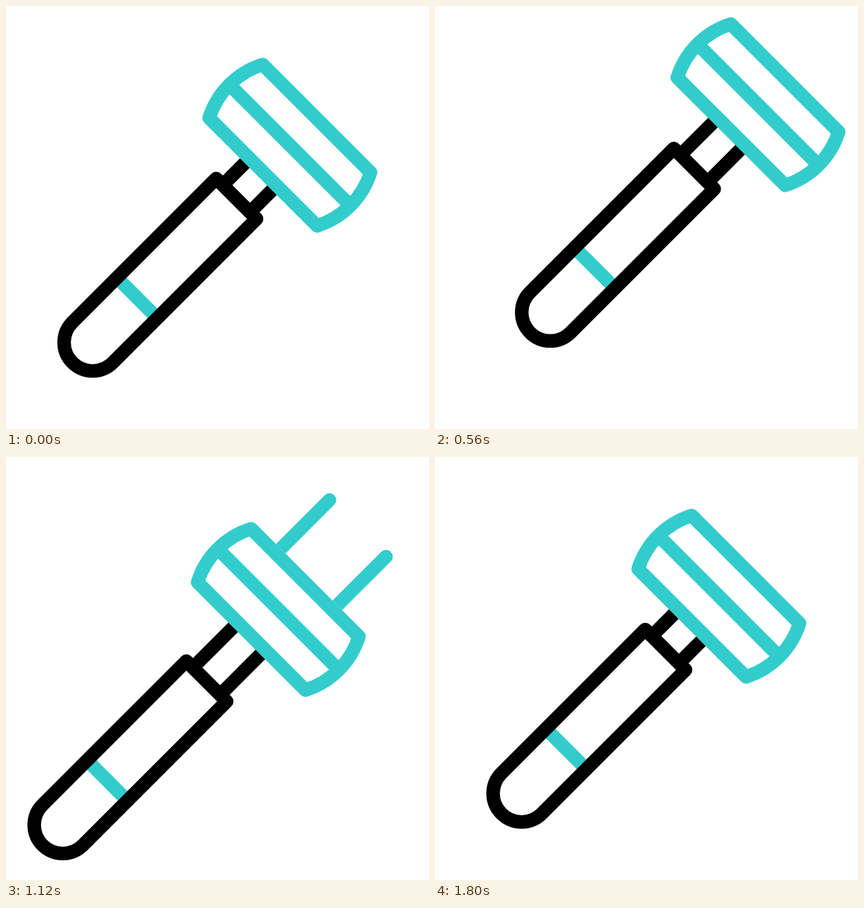
An HTML page with a canvas that plays this animation: 640 px wide and 640 px high, repeating every 2 s.

```html
<!DOCTYPE html>
<html lang="en">
<head>
<meta charset="utf-8">
<title>Razor</title>
<style>
html, body { margin: 0; width: 100%; height: 100%; overflow: hidden; background: #fff; }
canvas { display: block; width: 640px; height: 640px; }
</style>
</head>
<body>
<canvas id="stage" width="640" height="640"></canvas>
<script>
const ctx = document.getElementById('stage').getContext('2d');
const TEAL = '#33cccc', BLACK = '#000';
const LOOP = 2000, STEP = 40, STROKE = 20.5;

// Keys are [time, ...values]
const BODY_KEYS = [[0, 0, 0], [645, 44.5, -46.6], [1188, -47.4, 50], [1810, 0, 0]];
const REACH_KEYS = [[120, 0], [970, 42], [1710, 0]];
const TRAIL_KEYS = [[1188, 300], [1810, 146]];
const TRAIL_START = 700;

// The razor lies along x, MID is its long axis
const MID = 452.6;
const HANDLE = { tail: -267.2, top: 40.4, radius: 43.2, band: -172 };
const HEAD = { back: 97.6, front: 212, half: 115.4, radius: 124 };
const ROD_GAP = 29.1, TRAIL_GAP = 60.5;

// cubic-bezier(.5, 0, .5, 1)
function ease(x) {
  let lo = 0, hi = 1;
  for (let i = 0; i < 30; i++) {
    const p = (lo + hi) / 2;
    if (1.5 * p - 1.5 * p * p + p ** 3 < x) lo = p; else hi = p;
  }
  return lo * lo * (3 - 2 * lo);
}

function at(keys, t) {
  if (t <= keys[0][0]) return keys[0].slice(1);
  for (let i = 1; i < keys.length; i++) {
    const [t0, ...from] = keys[i - 1], [t1, ...to] = keys[i];
    if (t < t1) {
      const k = ease((t - t0) / (t1 - t0));
      return from.map((v, j) => v + (to[j] - v) * k);
    }
  }
  return keys[keys.length - 1].slice(1);
}

function place(x, y) {
  ctx.setTransform(1, 0, 0, 1, x, y);
  ctx.rotate(-Math.PI / 4);
}

function line(color, x0, y0, x1, y1, cap = 'butt') {
  ctx.strokeStyle = color;
  ctx.lineCap = cap;
  ctx.beginPath();
  ctx.moveTo(x0, y0);
  ctx.lineTo(x1, y1);
  ctx.stroke();
}

function drawHandle() {
  const { tail, top, radius, band } = HANDLE;
  line(TEAL, band, MID - radius, band, MID + radius);
  ctx.strokeStyle = BLACK;
  ctx.beginPath();
  ctx.moveTo(top, MID - radius);
  ctx.arc(tail, MID, radius, -Math.PI / 2, Math.PI / 2, true);
  ctx.lineTo(top, MID + radius);
  ctx.closePath();
  ctx.stroke();
}

function drawHead(reach) {
  const { back, front, half, radius } = HEAD;
  const x = (back + front) / 2 + reach;
  const h = Math.asin((front - back) / 2 / radius);
  const shift = half - radius * Math.cos(h);
  const q = Math.PI / 2;
  const bulge = radius + shift;
  line(TEAL, x, MID - bulge, x, MID + bulge);
  ctx.beginPath();
  ctx.arc(x, MID - shift, radius, -q + h, -q - h, true);
  ctx.arc(x, MID + shift, radius, q + h, q - h, true);
  ctx.closePath();
  ctx.stroke();
}

// Two streaks seen only in front of the head
function drawTrails(bodyX, bodyY, reach, tip) {
  ctx.save();
  place(bodyX, bodyY);
  ctx.beginPath();
  ctx.rect(HEAD.front + reach + STROKE / 2, -200, 900, 1400);
  ctx.clip();
  place(0, 0);
  for (const side of [-1, 1]) {
    const y = MID + side * TRAIL_GAP;
    line(TEAL, 100, y, tip, y, 'round');
  }
  ctx.restore();
}

function draw(t) {
  const [x, y] = at(BODY_KEYS, t);
  const [reach] = at(REACH_KEYS, t);
  const [tip] = at(TRAIL_KEYS, t);

  ctx.setTransform(1, 0, 0, 1, 0, 0);
  ctx.fillStyle = '#fff';
  ctx.fillRect(0, 0, 640, 640);
  ctx.lineWidth = STROKE;
  ctx.lineJoin = 'round';

  if (t >= TRAIL_START) drawTrails(x, y, reach, tip);
  place(x, y);
  for (const side of [-1, 1]) {
    const rod = MID + side * ROD_GAP;
    line(BLACK, HANDLE.top, rod, HEAD.back + reach, rod);
  }
  drawHandle();
  drawHead(reach);
}

const start = performance.now();
function tick() {
  const t = (performance.now() - start) % LOOP;
  draw(Math.floor(t / STEP) * STEP);
  requestAnimationFrame(tick);
}
tick();
</script>
</body>
</html>
```
